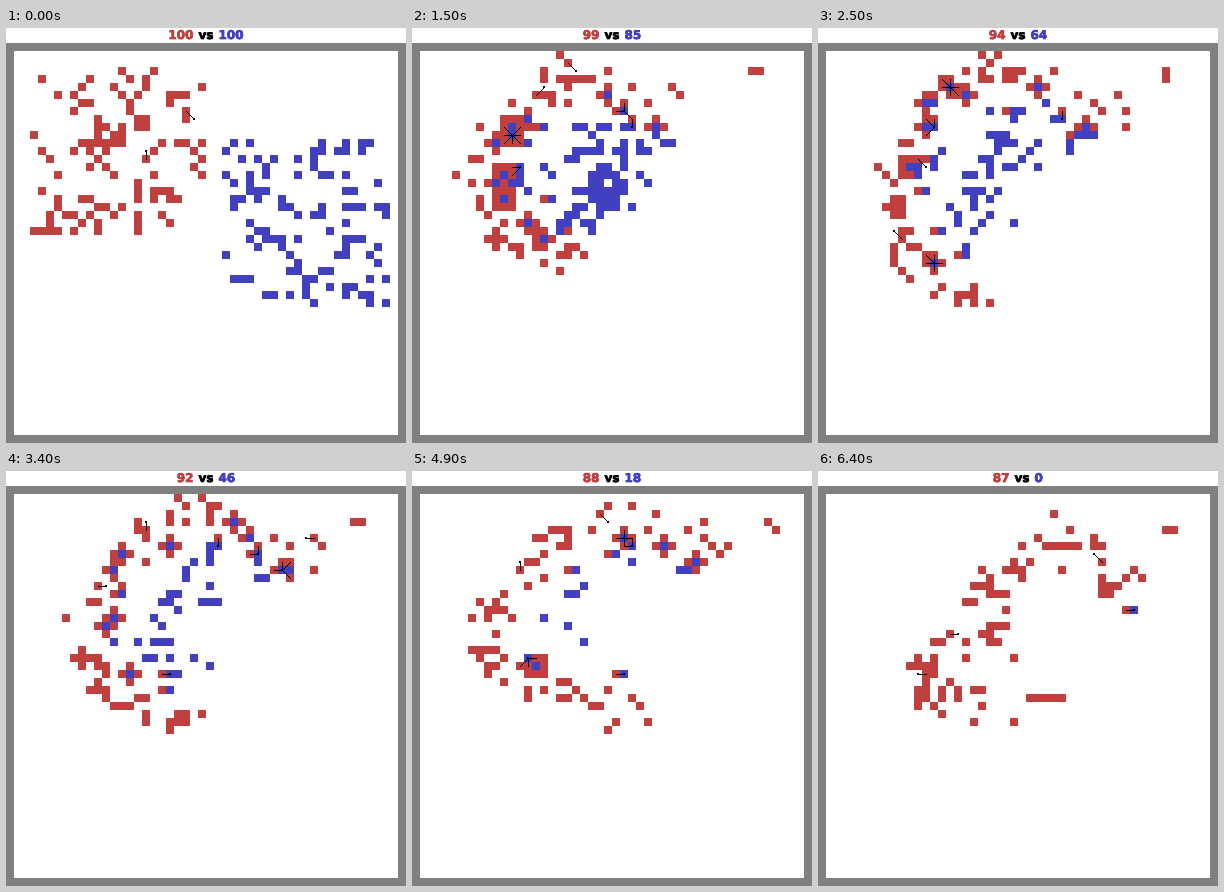
Recreate the animation shown at these times as a matplotlib script. Size 400 px wide and 415 px high, loop 6500 ms.

```python
import math
import random
from itertools import product

import matplotlib.pyplot as plt
import numpy as np
from matplotlib.animation import FuncAnimation
from matplotlib.patheffects import withStroke

W, H, DPI = 400, 415, 80
PX = 72 / DPI
CELL, TOP, GRID, UNITS = 8, 15, 50, 100
FRAMES, STEP, LAST = 65, 100, 63
RED, BLUE, WALL, BLACK = (192, 64, 64), (64, 64, 192), (128,) * 3, (0,) * 3

DIRS = [d for d in product((-1, 0, 1), repeat=2) if any(d)]
RINGS = sorted(product(range(-4, 5), repeat=2), key=lambda d: math.hypot(*d))

# The red line bends round the blue core; both are given at these times, in cells.
TIMES = [6, 15, 25, 43, 55, 63]
FRONT = np.array([
    [(15, 29), (11, 25), (13, 21), (14, 18), (19, 12), (22, 7), (33, 6), (43, 3)],
    [(20, 26), (13, 24), (9, 19), (9, 13), (13, 8), (21, 3), (33, 8), (44, 3)],
    [(20, 32), (11, 27), (9, 18), (12, 11), (16, 4), (26, 3), (38, 9), (44, 3)],
    [(26, 26), (17, 24), (10, 23), (11, 13), (17, 5), (30, 3), (39, 9), (44, 4)],
    [(29, 31), (18, 24), (9, 20), (7, 16), (17, 7), (27, 5), (40, 9), (44, 3)],
    [(30, 26), (14, 26), (12, 21), (22, 17), (20, 11), (33, 6), (39, 13), (44, 5)],
])
CORE = np.array([(31, 20), (26, 17), (23, 16), (23, 14), (25, 13), (39, 15)])
REACH = np.array([0.95, 0.95, 0.95, 0.95, 0.95, 0])

rng = np.random.default_rng(4)


def at(t, keys):
    """Linear blend of keyed values at time t."""
    k = np.interp(t, TIMES, range(len(TIMES)))
    i = min(int(k), len(TIMES) - 2)
    return keys[i] + (keys[i + 1] - keys[i]) * (k - i)


def rank(values):
    return values.argsort().argsort() / (len(values) - 1)


class Team:
    def __init__(self, x, y, w, h):
        spots = rng.choice(w * h, UNITS, replace=False)
        self.home = np.column_stack((x + spots % w, y + spots // w))
        self.along = 0.87 * rank(self.home[:, 0] - self.home[:, 1])
        self.depth = rank(-self.home.sum(axis=1))
        self.offset = rng.normal(0, 1, (UNITS, 2))
        self.phase = rng.uniform(0, math.tau, (UNITS, 2))

    def line(self, t):
        pts = at(t, FRONT)
        k = self.along * (len(pts) - 1)
        return np.column_stack([np.interp(k, range(len(pts)), p) for p in pts.T])

    def move(self, t, goal, spread):
        """Leave home, then wander about the goal."""
        wander = np.sin(self.phase + 0.65 * t)
        go = min(t / TIMES[0], 1)
        pos = self.home + (goal + spread * (self.offset + wander) - self.home) * go
        return np.rint(pos).astype(int)


red_team = Team(3, 3, 22, 21)
blue_team = Team(27, 12, 21, 21)
red_team.along[red_team.along > 0.855] = 1  # two stragglers in the far corner


def settle(cell, taken):
    """Nearest free cell inside the walls."""
    for d in RINGS:
        c = tuple(min(max(int(v) + e, 1), GRID - 2) for v, e in zip(cell, d))
        if c not in taken:
            break
    taken.add(c)
    return c


def units_at(t):
    reds, blues = counts(t)
    core, reach = at(t, CORE), at(t, REACH)
    power = np.interp(t, TIMES, [1.1, 1.2, 0.9, 0.5, 0.3, 0.3])
    depth = (reach * blue_team.depth ** power)[:, None]
    goal = core + (blue_team.line(t) - core) * depth
    spread = 1.9 - 1.2 * depth if reach else 0

    taken = set()
    blue = [settle(c, taken) for c in blue_team.move(t, goal, spread)[:blues]]
    foes = np.array(blue)
    red = []
    for cell in red_team.move(t, red_team.line(t), 1.25)[:reds]:
        gap = np.hypot(*(foes - cell).T)
        # A red unit close to a blue one closes in on it.
        red.append(settle(foes[gap.argmin()] if gap.min() < 2.5 else cell, taken))
    return red, blue


def strikes_at(t, red, blue):
    """Pairs of struck cell and direction towards the attacker."""
    pick = random.Random(t)
    reds, taken = set(red), set(red + blue)
    melee = []
    for x, y in blue:
        dirs = [d for d in DIRS if (x + d[0], y + d[1]) in reds]
        if dirs:
            melee.append(((x, y), dirs))
    hits = pick.sample(melee, min(4, len(melee)))
    for x, y in pick.sample(red, 3):
        dx, dy = pick.choice(DIRS)
        if (x - dx, y - dy) not in taken:
            hits.append(((x - dx, y - dy), [(dx, dy)]))
    return hits


def counts(f):
    times = [0] + TIMES + [LAST + 1]
    return (round(np.interp(f, times, [100, 99, 99, 94, 89, 87, 87, 87])),
            round(np.interp(f, times, [100, 99, 85, 64, 27, 8, 1, 0])))


def paint(f):
    t = min(f, LAST)
    red, blue = units_at(t)
    cells = np.full((GRID, GRID, 3), 255, np.uint8)
    cells[[0, -1]] = cells[:, [0, -1]] = WALL
    for side, color in ((red, RED), (blue, BLUE)):
        for x, y in side:
            cells[y, x] = color
    img = cells.repeat(CELL, axis=0).repeat(CELL, axis=1)
    for (x, y), dirs in strikes_at(t, red, blue):
        cx, cy = CELL * x + CELL // 2, CELL * y + CELL // 2
        img[cy - 1:cy + 1, cx - 1:cx + 1] = BLACK
        for (dx, dy), k in product(dirs, range(CELL + 1)):
            img[cy + k * dy, cx + k * dx] = BLACK
    return img


fig = plt.figure(figsize=(W / DPI, H / DPI), dpi=DPI, facecolor="white")
ax = fig.add_axes([0, 0, 1, 1])
board = ax.imshow(paint(0), extent=(0, W, H, TOP), interpolation="nearest",
                  aspect="auto")
ax.set(xlim=(0, W), ylim=(H, 0))
ax.axis("off")


def label(text, color, align):
    ink = np.array(color) / 255
    return ax.text(W / 2, 11, text, color=ink, ha=align, va="baseline",
                   family="DejaVu Sans", weight="bold", size=12 * PX,
                   path_effects=[withStroke(linewidth=0.7 * PX, foreground=ink)])


red_text = label("", RED, "right")
vs_text = label("vs", BLACK, "center")
blue_text = label("", BLUE, "left")


def draw(f):
    board.set_data(paint(f))
    a, b = map(str, counts(f))
    mid = W / 2 + 4 * (len(a) - len(b))
    red_text.set(text=a, x=mid - 12.5)
    vs_text.set_x(mid)
    blue_text.set(text=b, x=mid + 12.5)
    return board, red_text, vs_text, blue_text


anim = FuncAnimation(fig, draw, frames=FRAMES, interval=STEP, repeat=True,
                     repeat_delay=0, blit=False)
plt.show()
```
